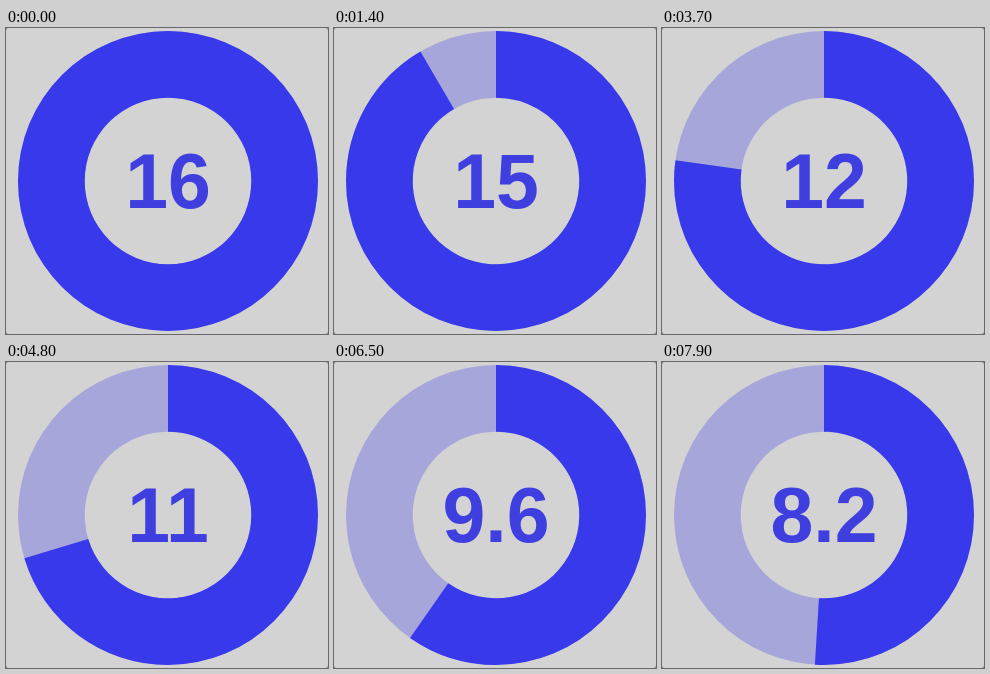
Recreate the animation shown at these times as an HTML page with a canvas. Size 322 px wide and 306 px high, loop 8 s.

```html
<!DOCTYPE html>
<html lang="en">
<head>
<meta charset="utf-8">
<title>Countdown ring</title>
<style>
  html, body { margin: 0; width: 100%; height: 100%; overflow: hidden; background: #d3d3d3; }
  canvas { display: block; }
</style>
</head>
<body>
<canvas id="stage" width="322" height="306"></canvas>
<script>
const ctx = document.getElementById('stage').getContext('2d');
const W = 322, H = 306;
const CX = 162, CY = 153, OUTER = 150, INNER = 83.3;
const LOOP = 8000, STEP = 100;
const TOTAL = 16, LAG = 0.055; // seconds
const TOP = -Math.PI / 2, TURN = Math.PI * 2;

function ring(from, to, color) {
  ctx.fillStyle = color;
  ctx.beginPath();
  ctx.arc(CX, CY, OUTER, from, to);
  ctx.arc(CX, CY, INNER, to, from, true);
  ctx.fill();
}

function background() {
  ctx.fillStyle = '#808080';
  ctx.fillRect(0, 0, W, H);
  ctx.fillStyle = '#d3d3d3';
  ctx.beginPath();
  ctx.roundRect(0, 0, W, H, 3);
  ctx.fill();
}

function draw(ms) {
  const left = Math.min(TOTAL, TOTAL - ms / 1000 + LAG);
  background();
  ring(TOP, TOP + TURN, '#a6a6da');
  ring(TOP, TOP + TURN * left / TOTAL, '#3939ec');

  ctx.fillStyle = '#3f3fe0';
  ctx.font = 'bold 77px "Liberation Sans", Arial, sans-serif';
  ctx.textAlign = 'center';
  ctx.fillText(left.toPrecision(2), CX, 179.5);
}

const start = performance.now();
function frame() {
  const t = (performance.now() - start) % LOOP;
  draw(Math.floor(t / STEP) * STEP);
  requestAnimationFrame(frame);
}
draw(0);
requestAnimationFrame(frame);
</script>
</body>
</html>
```
